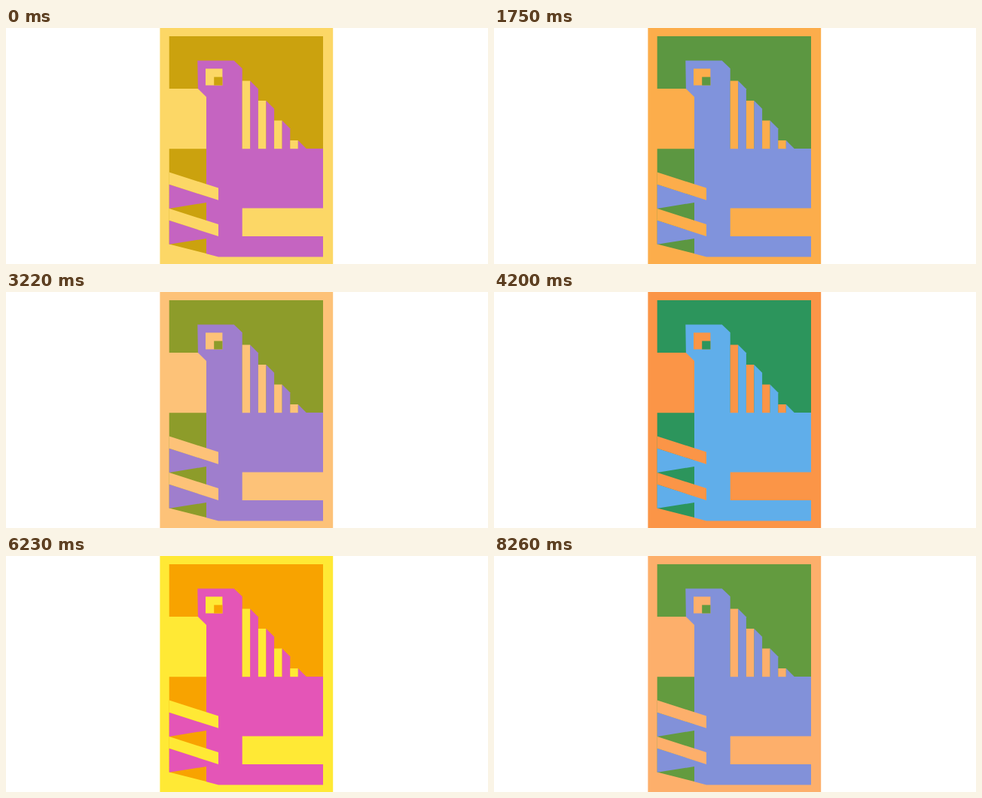
Recreate the animation shown at these times as an HTML page. Size 640 by 315 pixels, loop 8330 ms.

```html
<!DOCTYPE html>
<html lang="en">
<head>
<meta charset="utf-8">
<title>Bird poster</title>
<style>
  html, body { margin: 0; width: 100%; height: 100%; overflow: hidden; background: #fff; }
  svg { display: block; width: 100%; height: 100%; }
  .paper { fill: var(--paper); }
  .ground { fill: var(--ground); }
  .bird { fill: var(--bird); }
</style>
</head>
<body>
<svg viewBox="0 0 640 315">
  <rect class="paper" x="204.4" width="229.8" height="315"/>
  <path class="ground" d="M216.7 11H421V161.2H266V81H216.7Z M216.7 161.2H266V301L216.7 288.6Z"/>
  <path class="bird" d="M254.3 43.5H302.7L313.7 54V161H421V240.5H313.7V278H421V305.4H282L266 301.2V92L254.9 81Z"/>
  <path class="bird" d="M216.7 208.8L266 224.5V233L216.7 241Z M216.7 256.8L266 272.5V281L216.7 288.8Z"/>
  <path class="paper" d="M216.7 192.6L282 213.5V229.8L216.7 208.8Z M216.7 241L282 262V278L216.7 256.8Z"/>
  <rect class="paper" x="265" y="54.3" width="22.4" height="22.2"/>
  <rect class="ground" x="276.2" y="65.4" width="11.2" height="11.1"/>
  <g id="feathers"></g>
</svg>
<script>
const LOOP = 8330, STEP = 70;

const feathers = document.getElementById('feathers');
for (let i = 0; i < 4; i++) {
  const x = 313.7 + i * 21.2, top = 70.5 + i * 26.5, mid = x + 10.5, end = x + 21.2;
  feathers.innerHTML +=
    `<path class="paper" d="M${x} 161.2V${top}H${mid}V161.2Z"/>` +
    `<path class="bird" d="M${mid} 161.2V${top}L${end} ${top + 10.7}V161.2Z"/>`;
}

// Each palette lists paper, ground and bird as RGB.
const rgb = hex => [1, 3, 5].map(i => parseInt(hex.slice(i, i + 2), 16));
const palette = (...hexes) => hexes.map(rgb);
const gold = palette('#fcd766', '#cba20e', '#c564c1');
const leaf = palette('#fcad4b', '#5c9741', '#8093dc');
const peach = palette('#fdc278', '#8d9c2a', '#9f7ecd');
const sea = palette('#fb9547', '#2c955c', '#60aeea');
const candy = palette('#ffe935', '#f8a300', '#e455b7');
const olive = palette('#fbc444', '#949d26', '#a27bcf');
const dusk = palette('#fdaf6b', '#639b3f', '#8291d9');

const linear = p => p;
const easeOut = p => 1 - (1 - p) ** 2;
const keys = [
  [0, gold],
  [1750, leaf, easeOut],
  [1890, leaf, linear],
  [2660, peach, easeOut],
  [3570, peach, linear],
  [4200, sea, easeOut],
  [5460, sea, linear],
  [6230, candy, easeOut],
  [7070, candy, linear],
  [7350, olive, linear],
  [8260, dusk, easeOut],
  [LOOP, dusk, linear]
];

const names = ['--paper', '--ground', '--bird'];
const style = document.documentElement.style;

function draw(time) {
  const t = Math.floor((time % LOOP) / STEP) * STEP;
  const next = keys.findIndex(key => key[0] > t);
  const [start, from] = keys[next - 1];
  const [end, to, ease] = keys[next];
  const p = ease((t - start) / (end - start));
  names.forEach((name, i) => {
    const mix = from[i].map((v, c) => Math.round(v + (to[i][c] - v) * p));
    style.setProperty(name, `rgb(${mix})`);
  });
}

const begin = performance.now();
function frame() {
  draw(performance.now() - begin);
  requestAnimationFrame(frame);
}
frame();
</script>
</body>
</html>
```
